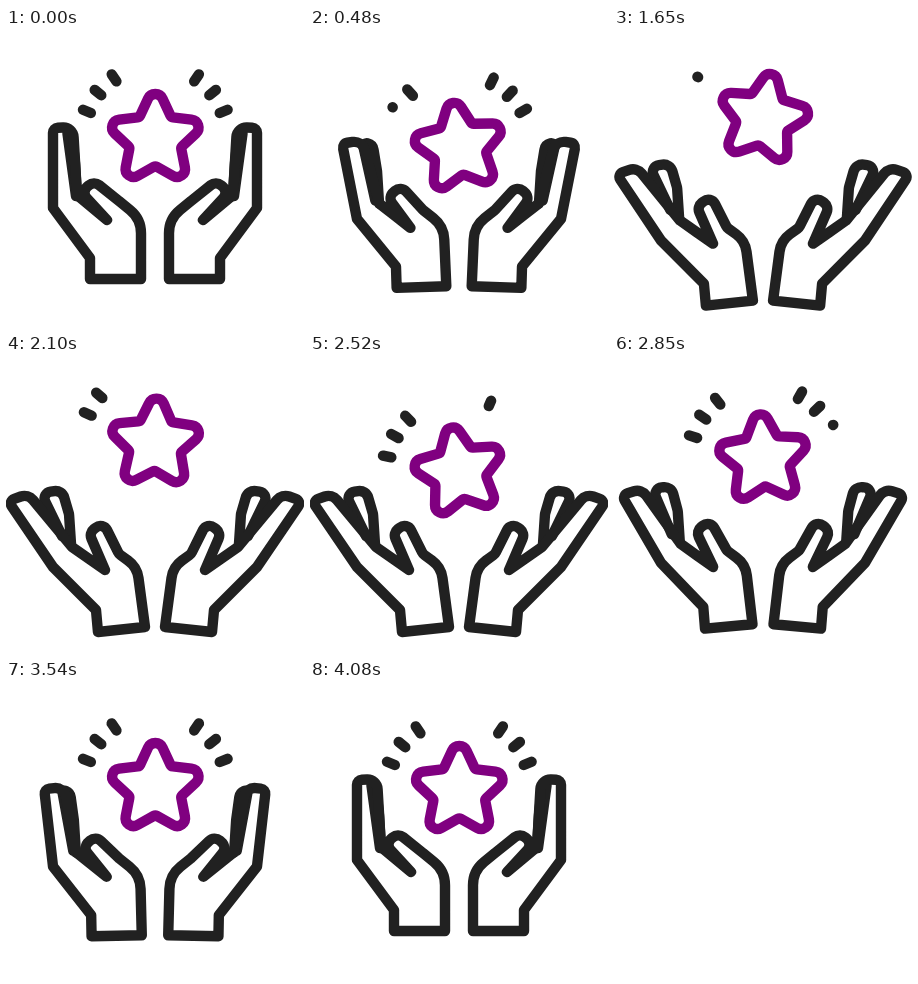
These frames come from a looping animation (298 px wide and 298 px high, 4530 ms). An HTML page with a canvas:

```html
<!DOCTYPE html>
<html lang="en">
<head>
<meta charset="utf-8">
<title>Hands and star</title>
<style>
  html, body { margin: 0; width: 100%; height: 100%; overflow: hidden; background: #fff; }
  canvas { display: block; width: 298px; height: 298px; }
</style>
</head>
<body>
<canvas id="stage"></canvas>
<script>
const SIZE = 298, LOOP = 4530, LAST = 4080, STEP = 30;
const INK = '#212121', PURPLE = '#800080';
const RAD = Math.PI / 180;

const canvas = document.getElementById('stage');
const ctx = canvas.getContext('2d');
const ratio = window.devicePixelRatio || 1;
canvas.width = canvas.height = Math.round(SIZE * ratio);

const clamp = v => Math.max(0, Math.min(1, v));
const mix = (a, b, k) => a + (b - a) * k;
const ease = x => (1 - Math.cos(Math.PI * clamp(x))) / 2;

// Swing from one turning point [time, value] to the next
const swing = (keys, t) => keys.reduce(([t0, v0], [t1, v1]) =>
  [t1, mix(v0, v1, ease((t - t0) / (t1 - t0)))])[1];

const starY = t => swing([[0, 111], [880, 126], [1940, 83], [2500, 118], [3050, 100], [3800, 111]], t);
const starTilt = t => swing([[0, 0], [1080, -19], [1750, 12], [2480, -10], [3150, 0]], t);
const handOpen = t => (1 - Math.exp(-((t / 777) ** 1.9))) * (1 - ease((t - 2520) / 1440));

// Hand corners: closed x, y, open x, y and corner radius where rounded
const PALM = [
  [101, 192, 99, 216], [75, 164, 83, 179, 8], [88, 153, 97, 168, 8],
  [113, 173, 113, 200, 8], [135, 191, 131, 213, 34],
  [135, 251, 139, 273], [84, 251, 92, 278], [84, 230, 90, 256], [47, 180, 47, 213],
  [47, 100, 2, 147, 5], [67, 99, 22, 140, 11], [71, 167, 66, 193]];
const FINGER = [
  [70, 168, 56, 182], [61, 102, 35, 139, 7], [66, 107, 56, 136, 9],
  [69, 135, 63, 160, 12], [71, 168, 65, 190]];

const polar = (angle, r) => [r * Math.sin(angle * RAD), -r * Math.cos(angle * RAD)];
const STAR = Array.from({ length: 10 }, (_, i) =>
  i % 2 ? [...polar(i * 36, 27), 3] : [...polar(i * 36, 56), 8]);

// Stroke a polygon or polyline of [x, y, radius] corners
function strokeRounded(points, closed) {
  const n = points.length;
  ctx.beginPath();
  if (closed) {
    const a = points[n - 1], b = points[0];
    ctx.moveTo((a[0] + b[0]) / 2, (a[1] + b[1]) / 2);
  }
  points.forEach(([x, y, r], i) => {
    if (!r) return ctx.lineTo(x, y);
    const a = points[(i + n - 1) % n], b = points[(i + 1) % n];
    const ax = a[0] - x, ay = a[1] - y, bx = b[0] - x, by = b[1] - y;
    const la = Math.hypot(ax, ay), lb = Math.hypot(bx, by);
    const cos = Math.max(-1, Math.min(1, (ax * bx + ay * by) / la / lb));
    const limit = Math.min(la, lb) / 2 * Math.tan(Math.acos(cos) / 2);
    ctx.arcTo(x, y, b[0], b[1], Math.min(r, limit));
  });
  if (closed) ctx.closePath();
  ctx.stroke();
}

function drawHand(open) {
  const pose = list => list.map(([x0, y0, x1, y1, r]) => [mix(x0, x1, open), mix(y0, y1, open), r]);
  strokeRounded(pose(FINGER), false);
  strokeRounded(pose(PALM), true);
}

// Six ticks fan around the star, leave one by one clockwise, then return
function drawTicks(t) {
  const each = 243, back = 1625;
  for (let i = 0; i < 6; i++) {
    const fan = i - 2.5;
    const angle = Math.sign(fan) * (25.5 + 17 * Math.abs(fan));
    const shown = Math.max(1 - clamp(t / each - i), clamp((t - back) / each - i));
    if (shown <= 0) continue;
    ctx.beginPath();
    ctx.moveTo(...polar(angle, 78));
    ctx.lineTo(...polar(angle, 78 - 8.5 * shown));
    ctx.stroke();
  }
}

function draw(t) {
  ctx.setTransform(ratio, 0, 0, ratio, 0, 0);
  ctx.fillStyle = '#fff';
  ctx.fillRect(0, 0, SIZE, SIZE);
  ctx.lineWidth = 10.4;
  ctx.lineCap = ctx.lineJoin = 'round';
  ctx.strokeStyle = INK;

  const open = handOpen(t);
  drawHand(open);
  ctx.save();
  ctx.translate(SIZE, 0);
  ctx.scale(-1, 1);
  drawHand(open);
  ctx.restore();

  ctx.translate(149.3, starY(t));
  ctx.rotate(starTilt(t) * RAD);
  drawTicks(t);
  ctx.strokeStyle = PURPLE;
  strokeRounded(STAR, true);
}

const start = performance.now();
function frame() {
  const t = (performance.now() - start) % LOOP;
  draw(Math.min(LAST, Math.floor(t / STEP) * STEP));
  requestAnimationFrame(frame);
}
frame();
</script>
</body>
</html>
```
